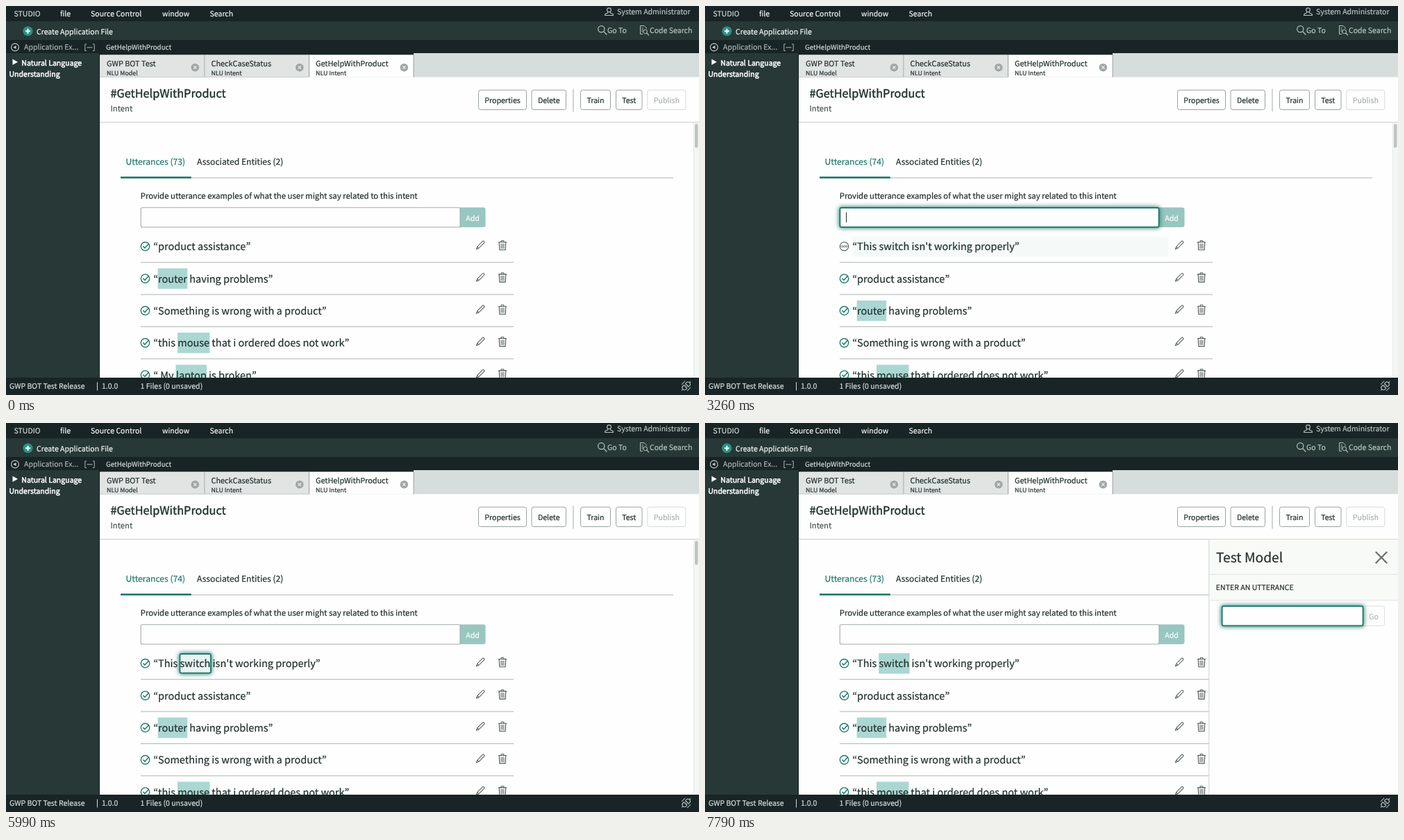
Recreate the animation shown at these times as an HTML page with a canvas. Size 998 by 561 pixels, loop 7990 ms.

```html
<!DOCTYPE html>
<html lang="en">
<head>
<meta charset="utf-8">
<title>Intent editor</title>
<style>
  html, body { margin: 0; width: 100%; height: 100%; overflow: hidden; background: #fdfefd; }
  canvas { display: block; width: 998px; height: 561px; }
</style>
</head>
<body>
<canvas id="stage" width="998" height="561"></canvas>
<script>
const ctx = document.getElementById('stage').getContext('2d');
const LOOP = 7990;
const FAMILY = '"Noto Sans CJK KR","Noto Sans CJK JP","Noto Sans CJK SC","Noto Sans CJK TC","Noto Sans CJK",sans-serif';
const EM = 0.895; // the CJK family draws its Latin letters larger than nominal
const TEAL = '#20796c', INK = '#22302f', DARK = '#182425', SIDE = '#273837', TAG = '#abd7d2', PAGE = '#fdfefd';
const LEFT = 135, BOTTOM = 536;
const PHRASE = "This switch isn't working properly";

const clamp = v => Math.max(0, Math.min(1, v));
const ramp = (t, from, to) => clamp((t - from) / (to - from));
const within = (t, from, to) => t >= from && t < to;

function rect(x, y, w, h, color) {
  ctx.fillStyle = color;
  ctx.fillRect(x, y, w, h);
}

function setFont(size) {
  ctx.font = `${(size * EM).toFixed(2)}px ${FAMILY}`;
}

// heft thickens the strokes a little, like heavier font smoothing
function text(str, x, y, size, color = INK, align = 'left', heft = 0.2) {
  setFont(size);
  ctx.fillStyle = ctx.strokeStyle = color;
  ctx.textAlign = align;
  ctx.lineWidth = heft;
  ctx.fillText(str, x, y);
  ctx.strokeText(str, x, y);
}

function line(points, color, width = 1) {
  ctx.beginPath();
  points.forEach(([x, y]) => ctx.lineTo(x, y));
  ctx.strokeStyle = color;
  ctx.lineWidth = width;
  ctx.stroke();
}

function circle(x, y, r, fill, stroke, width = 1) {
  ctx.beginPath();
  ctx.arc(x, y, r, 0, Math.PI * 2);
  if (fill) { ctx.fillStyle = fill; ctx.fill(); }
  if (stroke) { ctx.strokeStyle = stroke; ctx.lineWidth = width; ctx.stroke(); }
}

function box(x, y, w, h, r, fill, stroke, width = 1) {
  ctx.beginPath();
  ctx.roundRect(x, y, w, h, r);
  if (fill) { ctx.fillStyle = fill; ctx.fill(); }
  if (stroke) { ctx.strokeStyle = stroke; ctx.lineWidth = width; ctx.stroke(); }
}

function cross(x, y, r, color, width) {
  line([[x - r, y - r], [x + r, y + r]], color, width);
  line([[x - r, y + r], [x + r, y - r]], color, width);
}

function focusBox(x, y, w, h, strength, fill) {
  ctx.save();
  ctx.globalAlpha = strength;
  ctx.shadowColor = TEAL;
  ctx.shadowBlur = 6 * strength;
  box(x, y, w, h, 2, fill, TEAL, 2);
  ctx.restore();
  box(x + 1, y + 1, w - 2, h - 2, 1, fill);
}

function at(x, y, angle, draw) {
  ctx.save();
  ctx.translate(x, y);
  ctx.rotate(angle);
  draw();
  ctx.restore();
}

function clipPage() {
  ctx.beginPath();
  ctx.rect(LEFT, 168.3, 998 - LEFT, BOTTOM - 168.3);
  ctx.clip();
}

function pencil(x, y) {
  at(x, y, Math.PI / 4, () => {
    box(-1.6, -7.5, 3.2, 12, 0.8, null, '#4c5757', 1);
    line([[-1.6, 4.5], [0, 8], [1.6, 4.5]], '#4c5757');
  });
}

function trash(x, y) {
  const c = '#4c5757';
  line([[x - 6, y - 4.5], [x + 6, y - 4.5]], c, 1.1);
  line([[x - 2, y - 4.5], [x - 2, y - 6.5], [x + 2, y - 6.5], [x + 2, y - 4.5]], c);
  line([[x - 4.8, y - 4.5], [x - 4.2, y + 6.8], [x + 4.2, y + 6.8], [x + 4.8, y - 4.5]], c, 1.1);
  [-2, 0, 2].forEach(d => line([[x + d, y - 2.5], [x + d, y + 5]], c, 0.9));
}

function checkIcon(x, y) {
  circle(x, y, 6.2, null, TEAL, 1.4);
  line([[x - 3, y - 0.3], [x - 0.6, y + 2.4], [x + 5, y - 3.8]], TEAL, 1.5);
}

function pendingIcon(x, y) {
  circle(x, y, 6.2, null, '#4c5757', 1.1);
  [-3.2, 0, 3.2].forEach(d => circle(x + d, y, 1.2, null, '#4c5757', 0.8));
}

function topBars() {
  rect(0, 0, 998, 561, PAGE);
  rect(0, 0, 998, 22, DARK);
  rect(0, 22, 998, 28, SIDE);
  rect(0, 49, 998, 19, DARK);
  rect(0, 68, LEFT, BOTTOM - 68, SIDE);
  rect(LEFT - 1, 50, 1, BOTTOM - 50, '#142021');

  const menu = { STUDIO: 11.5, file: 78, 'Source Control': 122, window: 225, Search: 293.5 };
  for (const [label, x] of Object.entries(menu))
    text(label, x, 15, 11.8, label === 'STUDIO' ? '#cfd6d5' : '#f1f4f3');

  const pale = '#b9c3c1';
  circle(868.5, 5.8, 2.9, null, pale, 1.1);
  line([[866.8, 8.2], [866.5, 10], [863, 11.5], [862.5, 13.5], [874.5, 13.5], [874, 11.5], [870.5, 10], [870.2, 8.2]], pale, 1.1);
  text('System Administrator', 880, 12.4, 11.75, pale);

  circle(31.5, 36.3, 7, '#2b9180');
  line([[28, 36.3], [35, 36.3]], '#fff', 2);
  line([[31.5, 32.8], [31.5, 39.8]], '#fff', 2);
  text('Create Application File', 44, 41, 11.77, '#f4f7f6');

  circle(857.3, 33.3, 4.6, null, pale, 1.2);
  line([[860.6, 36.6], [865.3, 41.5]], pale, 1.3);
  text('Go To', 866, 39.3, 11.77, pale);
  line([[917, 40.5], [913.5, 40.5], [913.5, 28.5], [919, 28.5], [922, 31.5], [922, 33]], pale);
  [32, 34.5, 37].forEach(y => line([[915.2, y], [918, y]], pale, 0.9));
  circle(920.7, 37, 2.8, null, pale);
  line([[922.7, 39], [926, 42.3]], pale, 1.2);
  text('Code Search', 927, 39.3, 11.77, pale);
}

function sidebar() {
  const pale = '#a9b5b3';
  circle(13, 59.5, 5.4, null, '#c2cbc9', 1.1);
  ctx.fillStyle = '#c2cbc9';
  ctx.beginPath();
  ctx.moveTo(10.2, 59.5); ctx.lineTo(14.6, 57); ctx.lineTo(14.6, 62);
  ctx.fill();
  text('Application Ex...', 26, 63, 11.77, pale);
  line([[116, 55], [113.8, 55], [113.8, 64.5], [116, 64.5]], pale);
  line([[116.5, 59.8], [124.5, 59.8]], pale);
  line([[125, 55], [127.2, 55], [127.2, 64.5], [125, 64.5]], pale);

  ctx.fillStyle = '#fff';
  ctx.beginPath();
  ctx.moveTo(9.5, 76.5); ctx.lineTo(17, 80.7); ctx.lineTo(9.5, 85);
  ctx.fill();
  text('Natural Language', 22.3, 86.3, 11.8, '#fff', 'left', 0.5);
  text('Understanding', 4.5, 102.3, 11.8, '#fff', 'left', 0.5);
}

function fileTabs(unsaved) {
  text('GetHelpWithProduct', 144, 62.8, 10.9, '#d3dad9');
  rect(LEFT, 68, 998 - LEFT, 34.5, '#d7dddc');
  rect(LEFT, 68, 452, 2.5, DARK);
  const tabs = [['GWP BOT Test', 'NLU Model', 136], ['CheckCaseStatus', 'NLU Intent', 286.5], ['GetHelpWithProduct', 'NLU Intent', 437]];
  tabs.forEach(([name, kind, x], i) => {
    const active = i === 2;
    rect(x, 70.5, 150.5, 32, active ? PAGE : '#e0e4e3');
    rect(x + 149.6, 70, 1, 32.5, '#8d9796');
    text(name, x + 9, 86.7, 12.1);
    text(kind, x + 9, 99.8, 9.9);
    if (active && unsaved) {
      circle(x + 136, 88.8, 4.3, TEAL);
    } else {
      circle(x + 136.3, 88.7, 5.8, '#a0a8a7');
      cross(x + 136.3, 88.7, 2, '#f0f3f3', 1.2);
    }
  });
  rect(LEFT, 102, 302, 1, '#c8cecd');
}

function header() {
  text('#GetHelpWithProduct', 150.5, 132.3, 18.2, INK, 'left', 0.4);
  text('Intent', 150.5, 152.2, 12.67, '#4a5655');
  const buttons = [['Properties', 680.5, 69], ['Delete', 757, 49.5], ['Train', 827.5, 43], ['Test', 878.5, 37.5], ['Publish', 923.8, 55]];
  for (const [label, x, w] of buttons) {
    const off = label === 'Publish';
    box(x, 121.2, w, 28.3, 3, PAGE, off ? '#d6dada' : '#9aa2a1');
    text(label, x + w / 2, 139.6, 11.85, off ? '#abb1b0' : INK, 'center');
  }
  rect(816.5, 119.5, 1, 33, '#a3abaa');
  rect(LEFT, 167.3, 998 - LEFT, 1, '#c3c8c7');
}

function utterance(y, [before, tag, after], state = {}) {
  if (state.flash) {
    ctx.globalAlpha = state.flash;
    rect(212, y - 15, 455.5, 29.5, '#cce8e2');
    ctx.globalAlpha = 1;
  }
  (state.pending ? pendingIcon : checkIcon)(200.5, y - 0.3);

  const left = 219, size = 16.2, base = y + 5.4;
  setFont(size);
  const tagX = left + ctx.measureText(before).width;
  const tagW = ctx.measureText(tag).width;
  const end = left + ctx.measureText(before + tag + after).width;
  if (tag && state.tagged !== false) rect(tagX - 0.3, y - 15, tagW + 0.6, 29.5, TAG);
  if (state.ring) focusBox(tagX, y - 14, tagW + 0.5, 27.5, state.ring, '#e9f3f2');
  text('“', left, base, size, INK, 'right');
  text(before + tag + after, left, base, size);
  text('”', end, base, size);

  pencil(683, y - 2);
  trash(715, y - 2);
  rect(194, y + 22.2, 537, 1.1, '#b5bbba');
}

function typedCount(t) {
  if (t < 1260) return 0;
  if (t < 2060) return Math.round(25 * (Math.floor((t - 1260) / 80.5) + 1) / 11);
  if (t < 2120) return 25;
  if (t < 2190) return 26;
  return Math.min(34, 26 + Math.round(8 * (Math.floor((t - 2190) / 66.6) + 1) / 7));
}

function utteranceInput(t) {
  const typing = within(t, 1260, 3190);
  text('Provide utterance examples of what the user might say related to this intent', 193.7, 278.3, 12.73);
  box(653.5, 290.5, 37, 28.5, [0, 3, 3, 0], typing ? TEAL : '#98c6c0');
  text('Add', 672, 309.7, 11.9, '#fff', 'center');
  box(194.2, 290.8, 459.8, 28.2, 2, PAGE, '#a3abaa', 1.1);

  const focus = Math.min(ramp(t, 1000, 1120), 1 - ramp(t, 4880, 5090));
  if (t >= 1060 && focus > 0) focusBox(194.5, 291, 459, 27.8, focus, PAGE);

  const typed = typing ? PHRASE.slice(0, typedCount(t)) : '';
  text(typed, 203, 309, 11.8);
  const caretOn = within(t, 1060, 2860) || within(t, 3190, 3790) || within(t, 4320, 4920);
  if (caretOn) rect(203 + ctx.measureText(typed).width, 297.5, 1, 14.5, INK);
}

function content(t) {
  const added = t >= 3190, tagged = t >= 6460;
  const count = added && !tagged ? 74 : 73;
  const entities = within(t, 6460, 7260) ? 0 : 2;

  ctx.save();
  clipPage();
  rect(990, 168.3, 8, 368, '#f4f6f5');
  rect(990, 168.3, 0.8, 368, '#e3e6e5');
  box(992, 170, 4.6, 34.5, 2.3, '#bfc4c3');

  rect(165, 247.3, 796, 1.1, '#b5bbba');
  rect(165, 246, 101.8, 2.6, TEAL);
  text(`Utterances (${count})`, 172.6, 229, 13.57, TEAL);
  text(`Associated Entities (${entities})`, 275, 229, 13.55);
  utteranceInput(t);

  const rows = [
    ['product assistance', '', ''],
    ['', 'router', ' having problems'],
    ['Something is wrong with a product', '', ''],
    ['this ', 'mouse', ' that i ordered does not work'],
    [' My ', 'laptop', ' is broken']
  ];
  if (added) rows.unshift(['This ', 'switch', " isn't working properly"]);
  const fresh = {
    tagged,
    pending: t < 3790,
    ring: tagged ? 0 : ramp(t, 4950, 5130),
    flash: t < 5000
      ? Math.min(ramp(t, 3190, 3600), 1 - ramp(t, 3665, 3790))
      : Math.min(ramp(t, 6690, 7390), 1 - ramp(t, 7120, 7460))
  };
  rows.slice(0, 5).forEach((row, i) => utterance(347 + i * 46.35, row, added && i === 0 ? fresh : {}));
  ctx.restore();
}

function testPanel(t) {
  if (t < 7260) return;
  const slide = 1 - (1 - ramp(t, 7200, 7460)) ** 2;
  ctx.save();
  clipPage();
  ctx.translate(272.5 * (1 - slide), 0);
  rect(725.5, 168, 273, 368, PAGE);
  rect(725.5, 168, 273, 87.5, '#f8faf7');
  rect(725.3, 168, 1, 368, '#cfd4d3');
  rect(726, 218, 272, 1, '#dfe3e2');
  rect(726, 255.3, 272, 1, '#dfe3e2');
  text('Test Model', 736, 200.7, 21.5);
  cross(974, 194, 8.2, '#697372', 2.3);
  text('ENTER AN UTTERANCE', 735.8, 241.4, 11.8);
  box(945, 264, 33.5, 28.5, 3, PAGE, '#dce0df');
  text('Go', 963, 282.6, 11.8, '#b3b9b8', 'center');
  box(744.5, 264, 203, 28.5, 2, PAGE, '#a3abaa');
  if (t >= 7450) focusBox(744.7, 264.3, 202.8, 28, 1, PAGE);
  if (within(t, 7520, 7790)) rect(749, 270.5, 1, 15.5, INK);
  ctx.restore();
}

function statusBar(unsaved) {
  const pale = '#d5dcdb';
  rect(0, BOTTOM, 998, 561 - BOTTOM, DARK);
  text('GWP BOT Test Release', 5, 552.2, 11.77, pale);
  rect(131, 542.5, 1, 12, pale);
  text('1.0.0', 138, 552.2, 11.77, pale);
  text(`1 Files (${unsaved ? 1 : 0} unsaved)`, 193.5, 552.2, 11.77, pale);
  at(979.5, 548, -Math.PI / 4, () => {
    const c = '#aab5b3';
    box(-6.5, -3.2, 5, 6.4, [3, 0, 0, 3], null, c, 1.2);
    box(1.8, -3.2, 5, 6.4, [0, 3, 3, 0], null, c, 1.2);
    line([[-9, 0], [-6.5, 0]], c, 1.3);
    line([[6.8, 0], [9.3, 0]], c, 1.3);
    [-1.5, 1.5].forEach(y => line([[-1.5, y], [1, y]], c, 1));
    line([[-3, -6], [4, -6]], c, 1);
    line([[-4, 6], [3, 6]], c, 1);
  });
}

function draw(t) {
  const unsaved = within(t, 1260, 3190);
  ctx.textRendering = 'geometricPrecision';
  ctx.lineJoin = 'round';
  topBars();
  sidebar();
  fileTabs(unsaved);
  header();
  content(t);
  testPanel(t);
  statusBar(unsaved);
}

const start = performance.now();
function tick() {
  draw((performance.now() - start) % LOOP);
  requestAnimationFrame(tick);
}
tick();
</script>
</body>
</html>
```
